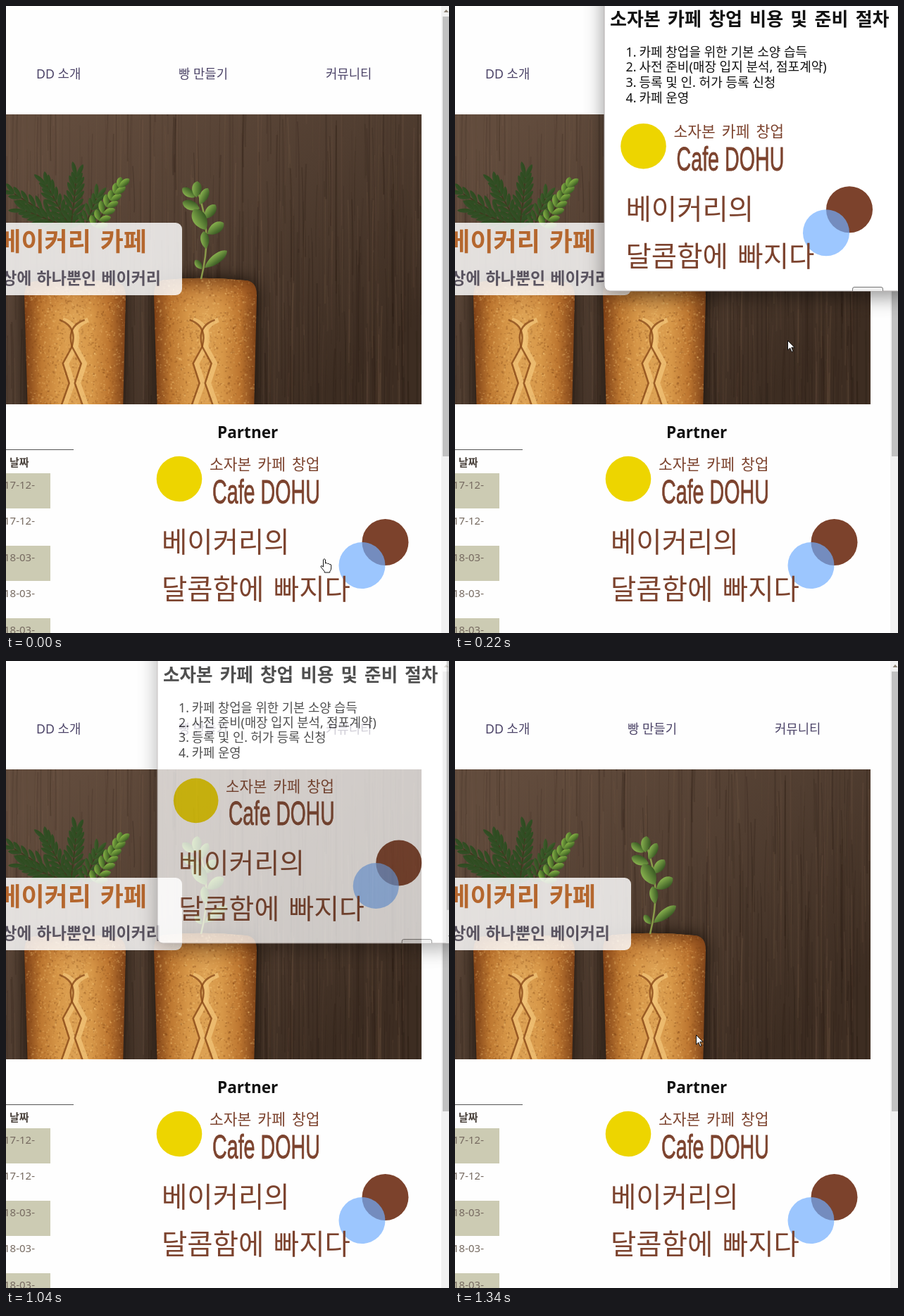
Recreate the animation shown at these times as an HTML page with a canvas. Size 629 px wide and 891 px high, loop 1410 ms.

```html
<!DOCTYPE html>
<html lang="ko">
<head>
<meta charset="utf-8">
<title>베이커리 카페</title>
<style>
  html, body { margin: 0; width: 100%; height: 100%; overflow: hidden; background: #fefefe; }
  canvas { position: absolute; left: 0; top: 154px; }
  svg { position: absolute; left: 0; top: 0; display: block; }
  text { font-family: "Noto Sans", "Noto Sans CJK KR", "Noto Sans CJK JP", sans-serif; white-space: pre; }
  .nav { font-size: 17.8px; fill: #4c4468; }
  .headline { font-size: 36px; font-weight: 700; fill: #b5672e; word-spacing: .1em; text-anchor: end; }
  .tagline { font-size: 23px; font-weight: 600; fill: #5a5460; word-spacing: .05em; text-anchor: end; }
  .date { font-size: 15px; fill: #766a60; text-anchor: end; }
  .th { font-size: 15px; font-weight: 700; fill: #4a423c; }
  .partner { font-size: 22.6px; font-weight: 700; fill: #111; }
  .brown { fill: #7c432e; }
  .intro { font-size: 21.5px; word-spacing: .16em; }
  .brand { font-family: "Liberation Sans", Arial, sans-serif; font-size: 49px; stroke: #7c432e; stroke-width: .9px; }
  .slogan { font-size: 39.5px; font-weight: 500; word-spacing: .08em; }
  .title { font-size: 26px; font-weight: 700; fill: #111; word-spacing: .135em; }
  .steps { font-size: 18px; fill: #111; }
  .window { fill: #fff; stroke: #b5b0b0; filter: drop-shadow(0 8px 14px rgba(0, 0, 0, .42)); }
  #popup, #hand { opacity: 0; }
</style>
</head>
<body>
<canvas id="photo" width="590" height="412"></canvas>
<svg width="629" height="891" viewBox="0 0 629 891">
  <defs>
    <g id="banner">
      <circle cx="246" cy="672" r="32.3" fill="#edd500"/>
      <text class="brown intro" x="289" y="659">소자본 카페 창업</text>
      <text class="brown brand" transform="translate(293 707) scale(.585 1)">Cafe DOHU</text>
      <circle cx="538.5" cy="762" r="33" fill="#7c422c"/>
      <circle cx="505.5" cy="795" r="33" fill="rgba(113,175,255,.69)"/>
      <text class="brown slogan" x="221" y="776">베이커리의</text>
      <text class="brown slogan" x="221" y="842.5">달콤함에 빠지다</text>
    </g>
    <clipPath id="frame"><path d="M212 -150H642V405H220Q212 405 212 397Z"/></clipPath>
  </defs>

  <text class="nav" x="43" y="102.5">DD 소개</text>
  <text class="nav" x="245" y="102.5">빵 만들기</text>
  <text class="nav" x="454" y="102.5">커뮤니티</text>

  <rect x="-20" y="308" width="270" height="103" rx="9" fill="#fff" fill-opacity=".83"/>
  <text class="headline" x="200" y="348">베이커리 카페</text>
  <text class="tagline" x="220" y="394.5">세상에 하나뿐인 베이커리</text>

  <path d="M0 630.5H96" stroke="#555"/>
  <text class="th" x="5" y="653.5">날짜</text>
  <g id="rows"></g>

  <text class="partner" x="300" y="613.5">Partner</text>
  <use href="#banner"/>

  <rect x="618" width="11" height="891" fill="#f1f1f1"/>
  <rect x="620" y="15" width="9" height="625" fill="#c1c1c1"/>
  <path d="M621.500 9l3.500-4 3.500 4Z" fill="#8a8072"/>

  <g id="popup">
    <rect class="window" x="212" y="-150" width="430" height="555" rx="8"/>
    <g clip-path="url(#frame)">
      <text class="title" x="220" y="27.500">소자본 카페 창업 비용 및 준비 절차</text>
      <g id="list"></g>
      <use href="#banner" x="21.500" y="-472.800"/>
      <rect x="564.500" y="399.500" width="43" height="24" rx="2.500" fill="#efefef" stroke="#767676"/>
      <text x="574" y="417" font-size="14">닫기</text>
      <rect x="628" y="-150" width="14" height="555" fill="#f1f1f1"/>
      <rect x="629" y="-150" width="12" height="507" fill="#c1c1c1"/>
      <path d="M631 394h7l-3.500 4Z" fill="#505050"/>
    </g>
  </g>

  <g fill="#fff" stroke="#111" stroke-linejoin="round">
    <path id="arrow" d="M.5 .5V14L3.700 11 6 16.500 8 15.600 5.800 10.200H10Z"/>
    <path id="hand" d="M4.500 12V1.800Q6 -.5 7.500 1.800V7Q9.500 5.500 10.500 7.500 12.500 6.500 13.300 8.500 15.700 7.800 15.700 10V14Q15.500 17 13.800 18.500V20H6.200V18.500L1 12Q.8 9 4.500 12Z"/>
  </g>
</svg>
<script>
const LOOP = 1410;
const byId = id => document.getElementById(id);

// Page rows and popup list
byId("rows").innerHTML = ["2017-12-", "2017-12-", "2018-03-", "2018-03-", "2018-03-"].map((date, i) => {
  const y = 664 + i * 51.5;
  const stripe = i % 2 ? "" : `<rect y="${Math.round(y)}" width="63" height="50" fill="#cccbb3"/>`;
  return `${stripe}<text class="date" x="41" y="${y + 21.5}">${date}</text>`;
}).join("");

byId("list").innerHTML = [
  "카페 창업을 위한 기본 소양 습득",
  "사전 준비(매장 입지 분석, 점포계약)",
  "등록 및 인. 허가 등록 신청",
  "카페 운영"
].map((line, i) => {
  const y = 71.7 + i * 21.6;
  return `<text class="steps" x="242.5" y="${y}">${i + 1}.</text><text class="steps" x="261.5" y="${y}">${line}</text>`;
}).join("");

// Hero photo
const ctx = byId("photo").getContext("2d");
let seed = 7;
const rand = (min = 0, max = 1) => {
  seed = (seed * 16807) % 2147483647;
  return min + (max - min) * seed / 2147483647;
};
const gradient = (x0, y0, x1, y1, ...stops) => {
  const g = ctx.createLinearGradient(x0, y0, x1, y1);
  stops.forEach((color, i) => g.addColorStop(i / (stops.length - 1), color));
  return g;
};

function wood() {
  ctx.fillStyle = gradient(100, 154, 430, 566, "#624c3d", "#513e31", "#3d2d22");
  ctx.fillRect(0, 154, 590, 412);
  for (let i = 0; i < 620; i++) {
    const x = rand(0, 590), y = rand(80, 540), bend = rand(-4, 4);
    ctx.strokeStyle = rand() < .6 ? `rgba(25,14,8,${rand(.04, .2)})` : `rgba(150,118,92,${rand(.03, .14)})`;
    ctx.lineWidth = rand(.6, 2.4);
    ctx.beginPath();
    ctx.moveTo(x, y);
    ctx.quadraticCurveTo(x + bend, y + 60, x + bend / 2, y + rand(60, 260));
    ctx.stroke();
  }
}

function leaf(x, y, angle, length, width, color) {
  ctx.save();
  ctx.translate(x, y);
  ctx.rotate(angle);
  ctx.fillStyle = gradient(0, -width, 0, width, color, "#2c4a1c");
  ctx.beginPath();
  ctx.moveTo(0, 0);
  ctx.bezierCurveTo(length * .3, -width, length * .85, -width, length, 0);
  ctx.bezierCurveTo(length * .85, width, length * .3, width, 0, 0);
  ctx.fill();
  ctx.restore();
}

function frond(x0, y0, x1, y1, count, length, width, color) {
  const angle = Math.atan2(y1 - y0, x1 - x0);
  ctx.strokeStyle = "#3c3a1e";
  ctx.lineWidth = 2;
  ctx.beginPath();
  ctx.moveTo(x0, y0);
  ctx.lineTo(x1, y1);
  ctx.stroke();
  for (let i = 0; i <= count; i++) {
    const k = i / count, x = x0 + (x1 - x0) * k, y = y0 + (y1 - y0) * k;
    for (const side of [-1, 1]) {
      leaf(x, y, angle + side * (.85 - k * .5), length * rand(.8, 1.1), width, color);
    }
  }
}

function cake(x, y, width) {
  const bottom = 580;
  ctx.save();
  ctx.beginPath();
  ctx.moveTo(x + 5, bottom);
  ctx.lineTo(x, y + 22);
  ctx.quadraticCurveTo(x + 1, y + 2, x + 18, y + 2);
  ctx.quadraticCurveTo(x + width / 2, y - 3, x + width - 16, y + 3);
  ctx.quadraticCurveTo(x + width, y + 4, x + width, y + 24);
  ctx.lineTo(x + width - 4, bottom);
  ctx.closePath();
  ctx.shadowColor = "rgba(15,8,2,.9)";
  ctx.shadowBlur = 24;
  ctx.fillStyle = gradient(x, 0, x + width, 0,
    "#7a3d14", "#bd7831", "#d79748", "#dda254", "#d79748", "#bd7630", "#7c4118");
  ctx.fill();
  ctx.shadowBlur = 0;
  ctx.clip();
  ctx.fillStyle = gradient(0, y, 0, y + 50, "rgba(110,55,18,.75)", "rgba(160,85,30,.25)", "rgba(190,110,45,0)");
  ctx.fillRect(x, y - 4, width, 60);
  for (let i = 0; i < 1500; i++) {
    ctx.fillStyle = rand() < .5 ? `rgba(115,58,16,${rand(.1, .32)})` : `rgba(250,207,130,${rand(.1, .34)})`;
    ctx.fillRect(x + rand(0, width), rand(y, 566), rand(1, 3), rand(1, 3));
  }
  // Split crust: dark line with a light lip beside it
  const middle = x + width * .47;
  for (const [shift, color, line] of [[5, "rgba(242,196,120,.75)", 7], [0, "rgba(139,76,25,.8)", 2.5]]) {
    for (const arm of [-1, 1]) {
      ctx.strokeStyle = color;
      ctx.lineWidth = line;
      ctx.beginPath();
      ctx.moveTo(middle - 18 * arm + shift, 446);
      ctx.quadraticCurveTo(middle + 8 * arm + shift, 455, middle + shift, 484);
      ctx.lineTo(middle + 13 * arm + shift, 508);
      ctx.lineTo(middle + 4 * arm + shift, 536);
      ctx.lineTo(middle + 16 * arm + shift, 570);
      ctx.stroke();
    }
  }
  ctx.restore();
}

function sprig() {
  ctx.strokeStyle = "#8a9a4a";
  ctx.lineWidth = 2.5;
  ctx.beginPath();
  ctx.moveTo(277, 388);
  ctx.bezierCurveTo(286, 350, 291, 310, 268, 252);
  ctx.stroke();
  const leaves = [
    [268, 272, -2.5, 22, 8], [270, 272, -1.5, 23, 9], [275, 282, -1.1, 26, 8],
    [275, 288, 3.5, 26, 9], [282, 302, -.9, 25, 9], [284, 318, -2.1, 34, 13],
    [286, 324, -.6, 28, 10], [284, 345, -1.7, 25, 8], [282, 372, -.65, 40, 9], [278, 374, -2.2, 16, 6]
  ];
  for (const [x, y, angle, length, width] of leaves) leaf(x, y, angle, length, width, "#94bf55");
}

ctx.translate(0, -154);
wood();
cake(26, 389, 144);
cake(210, 387, 146);
[[12, 267], [28, 291], [58, 255], [100, 244]].forEach(([x, y]) => frond(92, 316, x, y, 8, 23, 4, "#35502a"));
frond(112, 314, 128, 274, 5, 20, 4, "#41602f");
frond(126, 314, 160, 258, 6, 18, 6, "#93c34b");
sprig();

// Motion: hard steps from small tables
const play = (id, rows, style) => byId(id).animate(
  rows.map(([time, ...values]) => ({ offset: time / LOOP, easing: "step-end", ...style(...values) })),
  { duration: LOOP, iterations: Infinity, fill: "both" }
);

// time, x, y, scale, opacity
play("popup", [
  [0, 20, 9, .946, 0],
  [70, 20.1, 9.2, .946, .88],
  [140, 3, 1.4, .992, .99],
  [220, 0, 0, 1, 1],
  [1040, 6.2, 2.1, .985, .74],
  [1110, 18, 6.5, .954, .2],
  [1190, 20, 9, .946, 0]
], (x, y, scale, opacity) => ({ transform: `translate(${x}px, ${y}px) scale(${scale})`, opacity }));

// time, x, y
play("arrow", [
  [0, 0, -40],
  [220, 472, 475],
  [290, 508, 320],
  [370, 552, 170],
  [440, 585, 65],
  [520, 603, 4],
  [590, 605, -40],
  [1190, 599, -15],
  [1260, 490, 240],
  [1340, 342, 531]
], (x, y) => ({ transform: `translate(${x}px, ${y}px)` }));

// time, opacity
play("hand", [[0, 1], [220, 0]], opacity => ({ transform: "translate(446px, 785px)", opacity }));
</script>
</body>
</html>
```
